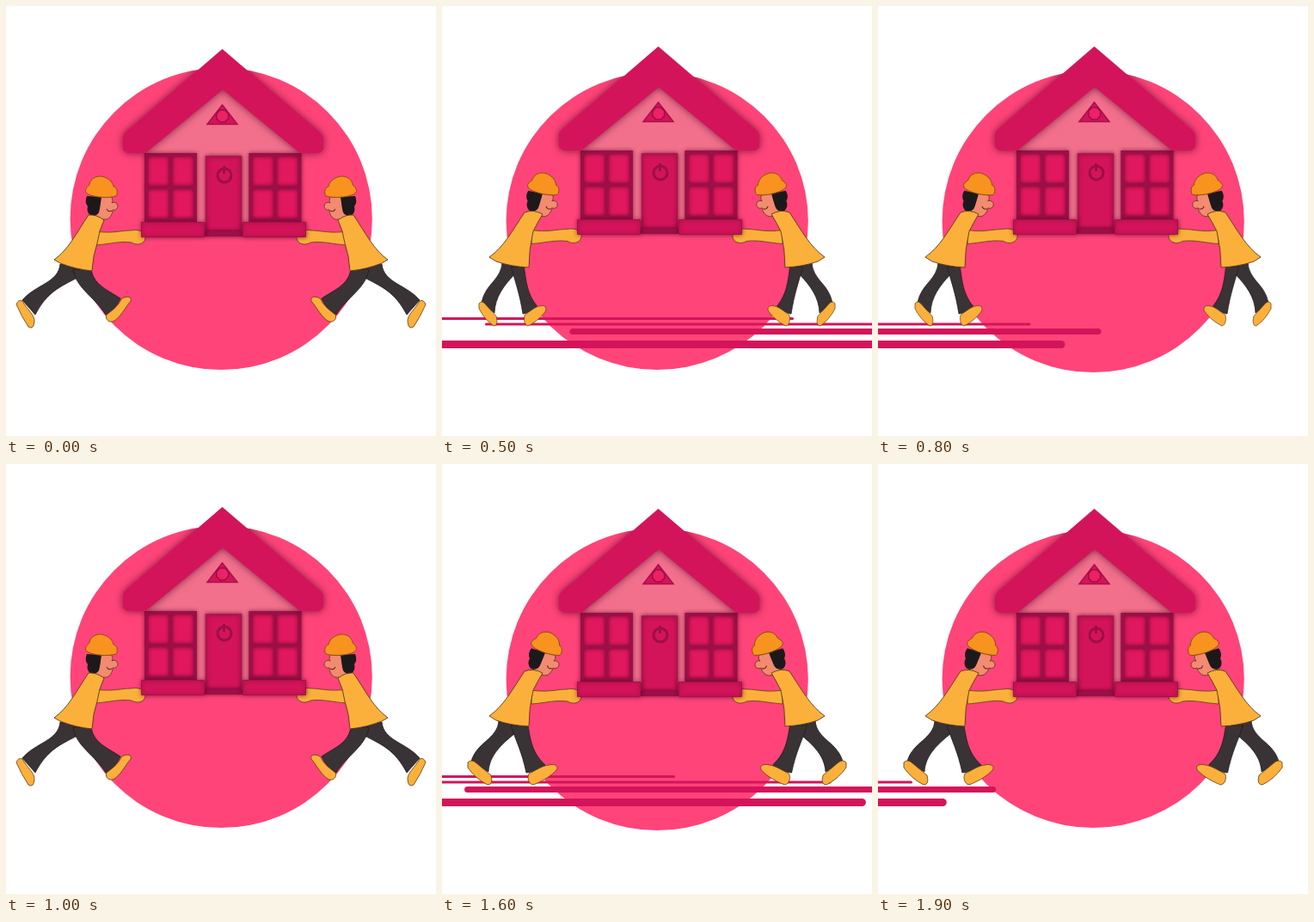
Animation of 500x500 px, one loop 2 s. Source, as an HTML page with a canvas:

```html
<!DOCTYPE html>
<html lang="en">
<head>
<meta charset="utf-8">
<title>Moving house</title>
<style>
  html, body { margin: 0; width: 100%; height: 100%; overflow: hidden; background: #fff; }
  canvas { display: block; width: 500px; height: 500px; }
</style>
</head>
<body>
<canvas id="stage" width="500" height="500"></canvas>
<script>
const ctx = document.getElementById('stage').getContext('2d');
const LOOP = 1000, STEP = 100;
const C = {
  disc: '#ff4479', deep: '#d4145a', wall: '#f2708c', pane: '#e2185e', frame: '#9c0f47',
  shirt: '#fbb03b', hat: '#f7931e', skin: '#f28b70', hair: '#1d191a', pants: '#393335', line: '#5e3a18'
};

const roof = new Path2D('M251.5 50L366 148Q369 151 369 154V167L364 171H342L252 97L162 171H141L136 167V153Q136 150 139 147Z');
const wall = new Path2D('M252 96L344 171V252H161V171Z');
const gable = new Path2D('M251.5 115L269 137.500H234Z');

const head = {
  hair: new Path2D('M94 221L111 222L109 236Q108 245 99 244Q93 240 95 233Q91 228 94 221Z'),
  face: new Path2D('M110 222H123Q125 227 123 229A4.500 4.500 0 1 1 124 237Q124 241 122 244Q119 249 113 248L107 252L102 244Q109 241 110 222Z'),
  smile: new Path2D('M117 236Q119 240 123 238'),
  hat: new Path2D('M93 213C95 208 97 210 97 207C99 200 105 198 110 198C118 199 124 204 125 210C130 211 130 219 128 221C117 224 102 222 96 219C92 217 92 214 93 213Z')
};
const arm = new Path2D('M104 262C122 265 134 261 145 261C155 259 163 263 162 270C161 277 152 279 146 275C132 273 120 277 104 278Z');

const wide = {
  torso: 'M96 243Q105 242 114 249Q108 261 106 276Q101 290 100 308Q80 306 63 299L56 295C72 284 82 264 96 243Z',
  back: 'M63 300C61 322 34 324 19 342L34 359C48 332 64 326 83 316L84 304Z',
  front: 'M78 306C81 328 104 339 116 359Q128 352 133 340C116 329 102 324 99 306Z',
  backShoe: 'M12 347Q14 341 19 343C24 352 34 360 33 367Q32 377 26 373Q18 361 12 347Z',
  frontShoe: 'M117 359C123 354 130 350 134 341C138 337 147 337 145 343C139 350 132 364 124 367C118 368 115 363 117 359Z'
};
const near = {
  torso: 'M96 241Q106 237 117 243Q111 253 106 263Q101 284 101 305Q80 304 63 298L55 293C72 281 82 262 96 241Z',
  back: 'M66 298C65 320 40 323 34 346L54 358C55 339 69 326 84 314L86 302Z',
  front: 'M80 304C86 322 93 335 98 359Q110 358 120 350C105 336 103 322 100 304Z',
  backShoe: 'M30 347Q34 343 39 347L57 362Q60 373 53 373Q39 366 30 353Z',
  frontShoe: 'M101 360C108 357 116 351 124 350C132 348 136 352 133 356C126 364 114 370 106 373C100 372 99 364 101 360Z'
};
for (const set of [wide, near])
  for (const part in set) set[part] = new Path2D(set[part]);

// Three poses repeat through the walk: contact, stride, passing.
// "reach" pulls in the leading leg of the man on the right.
const poses = [
  { set: near, house: 2, head: [4, -5, 14], spread: 1, lift: 0, reach: -4.5 },
  { set: wide, house: 0, head: [0, 0, 0], spread: 1, lift: 0, reach: 0 },
  { set: near, house: -3, head: [3, -4, 8], spread: .75, lift: -1, reach: 0 }
];

// y, weight, left end and length at 300 ms, speed in px per ms
const streaks = [
  [363.5, 3, 263, 422, 1.38],
  [370, 3, 325, 540, 1.375],
  [378.5, 7, 393, 478, 1.223],
  [393.5, 9, 233, 673, 1.377]
];

function paint(path, fill, stroke, width = 1) {
  ctx.fillStyle = fill;
  ctx.fill(path);
  if (stroke) {
    ctx.strokeStyle = stroke;
    ctx.lineWidth = width;
    ctx.stroke(path);
  }
}

function box(x, y, w, h, fill, stroke, width) {
  const p = new Path2D();
  p.rect(x, y, w, h);
  paint(p, fill, stroke, width);
}

function shade(blur) {
  ctx.shadowColor = blur ? 'rgba(70,0,30,.7)' : 'transparent';
  ctx.shadowBlur = blur;
}

function discPath(k) {
  const [top, bottom] = k === 0 ? [72, 423] : k % 2 ? [77, 423] : [75, 426];
  const p = new Path2D();
  p.ellipse(250.2, (top + bottom) / 2, 175.6, (bottom - top) / 2, 0, 0, Math.PI * 2);
  return p;
}

function drawWindow(x) {
  box(x, 171, 61, 80, C.pane);
  shade(5);
  ctx.strokeStyle = C.frame;
  ctx.lineWidth = 4;
  ctx.beginPath();
  ctx.rect(x + 2, 173, 57, 76);
  ctx.moveTo(x + 30.5, 173);
  ctx.lineTo(x + 30.5, 249);
  ctx.moveTo(x, 211);
  ctx.lineTo(x + 61, 211);
  ctx.stroke();
  shade(0);
}

function drawHouse(dy, disc) {
  ctx.save();
  ctx.translate(0, dy);
  paint(wall, C.wall);
  drawWindow(161);
  drawWindow(282.5);
  shade(5);
  box(232.5, 175, 41, 88, C.deep, '#b01150', 1.5);
  box(231, 262, 44, 6, C.frame);
  box(157.5, 251.500, 73, 17, C.deep, '#a81049');
  box(275.5, 251.500, 73, 17, C.deep, '#a81049');
  shade(0);

  ctx.strokeStyle = C.frame;
  ctx.lineWidth = 3;
  ctx.beginPath();
  ctx.arc(254, 197, 8, 0, Math.PI * 2);
  ctx.moveTo(253.5, 186);
  ctx.lineTo(253.5, 195);
  ctx.stroke();

  paint(gable, C.deep, '#a81049', 1.5);
  const knob = new Path2D();
  for (let i = 0; i < 8; i++) {
    const a = (i + .5) * Math.PI / 4;
    knob.lineTo(251.7 + 7.5 * Math.cos(a), 128 + 7.5 * Math.sin(a));
  }
  knob.closePath();
  paint(knob, '#ee2066', C.frame, 1.5);
  ctx.restore();

  // The roof's shadow falls only on the disc and the wall.
  ctx.save();
  ctx.clip(disc);
  ctx.translate(0, dy);
  shade(10);
  paint(roof, C.deep);
  ctx.restore();
  ctx.save();
  ctx.translate(0, dy);
  paint(roof, C.deep);
  ctx.restore();
}

function drawMan(pose, mirrored) {
  const { set, spread, lift } = pose;
  const [hx, hy, tilt] = pose.head;
  ctx.save();
  if (mirrored) {
    ctx.translate(500, 0);
    ctx.scale(-1, 1);
  }
  ctx.save();
  ctx.translate(82 * (1 - spread), lift);
  ctx.scale(spread, 1);
  paint(set.back, C.pants, '#211c1d', .8);
  paint(set.backShoe, C.shirt, C.line, .8);
  if (mirrored) ctx.translate(pose.reach, 0);
  paint(set.front, C.pants, '#211c1d', .8);
  paint(set.frontShoe, C.shirt, C.line, .8);
  ctx.restore();

  ctx.save();
  ctx.translate(0, pose.house / 2);
  paint(arm, C.shirt, C.line, .8);
  ctx.restore();

  ctx.translate(0, lift);
  ctx.save();
  ctx.translate(104 + hx, 244 + hy);
  ctx.rotate(tilt * Math.PI / 180);
  ctx.translate(-104, -244);
  paint(head.face, C.skin, C.line, .8);
  paint(head.hair, C.hair);
  ctx.strokeStyle = '#6b2a22';
  ctx.lineWidth = 1.2;
  ctx.stroke(head.smile);
  paint(head.hat, C.hat, '#8a4a0c', .9);
  ctx.restore();
  paint(set.torso, C.shirt, C.line, .9);
  ctx.restore();
}

function drawStreaks(t) {
  ctx.strokeStyle = C.deep;
  ctx.lineCap = 'round';
  for (const [y, w, left, len, speed] of streaks) {
    const x = left - speed * (t - 300);
    ctx.lineWidth = w;
    ctx.beginPath();
    ctx.moveTo(x + w / 2, y);
    ctx.lineTo(x + len - w / 2, y);
    ctx.stroke();
  }
  ctx.lineCap = 'butt';
}

function draw(time) {
  const k = Math.floor((time % LOOP) / STEP);
  const pose = poses[(k || 10) % 3];
  const disc = discPath(k);
  ctx.fillStyle = '#fff';
  ctx.fillRect(0, 0, 500, 500);
  paint(disc, C.disc);
  if (k) drawStreaks(k * STEP);
  drawMan(pose, false);
  drawMan(pose, true);
  drawHouse(pose.house, disc);
}

let start;
function tick(now) {
  start ??= now;
  draw(Math.max(0, now - start));
  requestAnimationFrame(tick);
}
draw(0);
requestAnimationFrame(tick);
</script>
</body>
</html>
```
